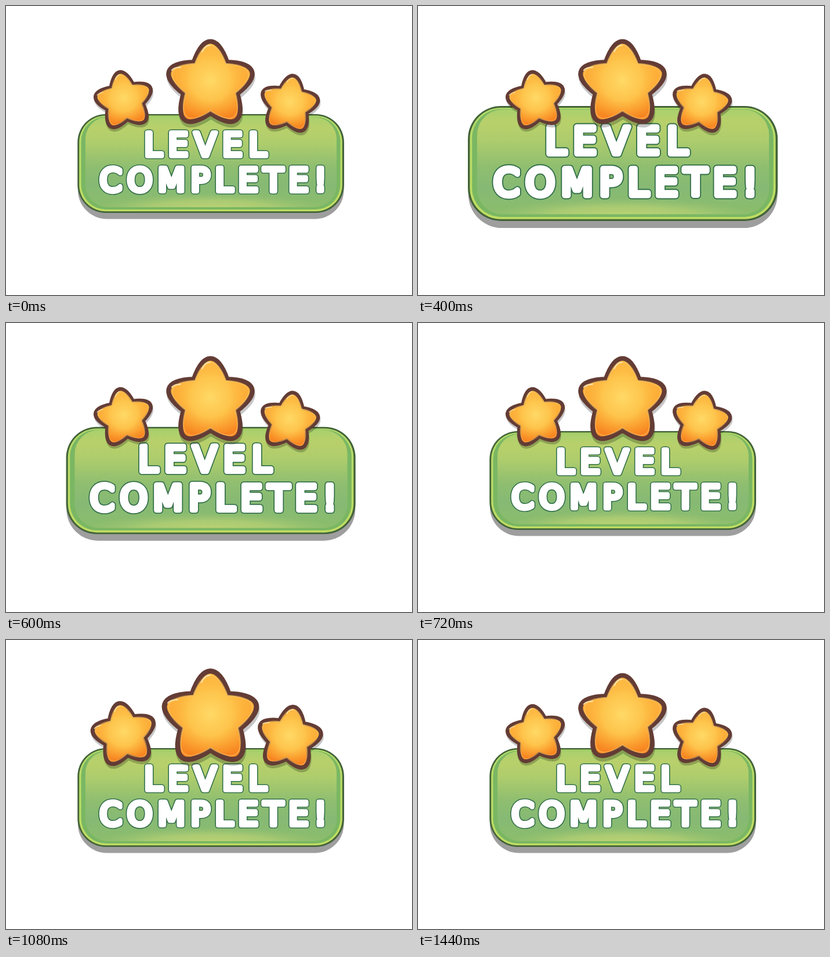
Write an HTML page that moves like this. It is 700 by 500 pixels and loops after 2 s.

```html
<!DOCTYPE html>
<html lang="en">
<head>
<meta charset="utf-8">
<title>Level complete</title>
<style>
  html, body { margin: 0; width: 100%; height: 100%; overflow: hidden; background: #fff; }
  svg { display: block; width: 700px; height: 500px; }
  text {
    font: 400 55px "DejaVu Sans", sans-serif;
    stroke-linejoin: round;
    stroke-linecap: round;
  }
  .edge { fill: #34704a; stroke: #34704a; stroke-width: 11px; }
  .face { fill: #fff; stroke: #fff; stroke-width: 7.8px; }
  .level { letter-spacing: 10.6px; }
  .complete { letter-spacing: 9.2px; }
</style>
</head>
<body>
<svg viewBox="0 0 700 500">
  <defs>
    <linearGradient id="panelFill" x2="0" y2="1">
      <stop offset="0" stop-color="#a9d06d"/>
      <stop offset=".12" stop-color="#b8d06b"/>
      <stop offset=".28" stop-color="#afcd6c"/>
      <stop offset=".55" stop-color="#8fbe70"/>
      <stop offset=".75" stop-color="#86b974"/>
      <stop offset="1" stop-color="#8cbd6c"/>
    </linearGradient>
    <linearGradient id="ringFill" x2="0" y2="1">
      <stop offset="0" stop-color="#b4da68"/>
      <stop offset="1" stop-color="#c0dd62"/>
    </linearGradient>
    <radialGradient id="panelGlow">
      <stop offset="0" stop-color="#bfd474"/>
      <stop offset=".55" stop-color="#b4cf74" stop-opacity=".75"/>
      <stop offset="1" stop-color="#9fc673" stop-opacity="0"/>
    </radialGradient>
    <linearGradient id="starFill" x2="0" y2="1">
      <stop offset="0" stop-color="#fdbb45"/>
      <stop offset=".55" stop-color="#fda833"/>
      <stop offset="1" stop-color="#f67f1e"/>
    </linearGradient>
    <radialGradient id="starGlow" gradientUnits="userSpaceOnUse" cx="0" cy="-8" r="72">
      <stop offset="0" stop-color="#ffd966"/>
      <stop offset=".5" stop-color="#fec84f" stop-opacity=".9"/>
      <stop offset="1" stop-color="#fdb23a" stop-opacity="0"/>
    </radialGradient>
    <clipPath id="panelClip"><rect x="137" y="192" width="433" height="156" rx="38"/></clipPath>
    <path id="starShape"/>
  </defs>

  <g id="banner">
    <rect x="124" y="198.5" width="458.5" height="170" rx="50" opacity=".38"/>
    <rect x="123.3" y="187" width="459.6" height="171" rx="49" fill="#426339"/>
    <rect x="126.2" y="189.5" width="453.6" height="165.8" rx="46" fill="url(#ringFill)"/>
    <rect x="129.5" y="191.5" width="447" height="160.5" rx="43" fill="#7ab763"/>
    <rect x="137" y="192" width="433" height="156" rx="38" fill="url(#panelFill)"/>
    <ellipse cx="353" cy="352" rx="200" ry="28" fill="url(#panelGlow)" clip-path="url(#panelClip)"/>
    <g id="words"></g>
  </g>
  <g id="stars"></g>
</svg>
<script>
const NS = "http://www.w3.org/2000/svg";
const $ = id => document.getElementById(id);

function add(parent, tag, attrs, content) {
  const node = document.createElementNS(NS, tag);
  for (const key in attrs) node.setAttribute(key, attrs[key]);
  if (content) node.textContent = content;
  parent.append(node);
  return node;
}

for (const layer of ["edge", "face"]) {
  add($("words"), "text", { class: layer + " level", x: 238.2, y: 258.6 }, "LEVEL");
  add($("words"), "text", { class: layer + " complete", x: 161.4, y: 320 }, "COMPLETE!");
}

// One puffy arm, repeated every 72 degrees
function starPath() {
  const arm = [[-24, -52], [-14, -74.5], [0, -74.5], [14, -74.5], [24, -52], [28.5, -39.2]];
  let d = "M-28.5-39.2";
  for (let i = 0; i < 5; i++) {
    const a = i * Math.PI * 0.4, c = Math.cos(a), s = Math.sin(a);
    const pts = arm.map(([x, y]) => (x * c - y * s).toFixed(2) + "," + (x * s + y * c).toFixed(2));
    d += "C" + pts.slice(0, 3).join(" ") + "C" + pts.slice(3).join(" ");
  }
  return d + "Z";
}
$("starShape").setAttribute("d", starPath());

function makeStar(x, y, size, turn, line) {
  const star = add($("stars"), "g", {});
  const pose = `rotate(${turn}) scale(${size})`;
  const width = line / size;
  const use = (parent, attrs) => add(parent, "use", { href: "#starShape", "stroke-linejoin": "round", ...attrs });
  use(star, { transform: `translate(1 ${5 * size + 1}) ${pose}`, stroke: "#000", "stroke-width": width, opacity: 0.22 });
  const body = add(star, "g", { transform: pose });
  use(body, { fill: "url(#starFill)", stroke: "#633c35", "stroke-width": width });
  use(body, { fill: "url(#starGlow)", transform: "scale(.95)" });
  use(body, { fill: "none", stroke: "#ffcc70", "stroke-width": 1.5, opacity: 0.6, transform: "scale(.91)" });
  add(body, "path", {
    d: "M-14-57Q-9-68-1-68M-66-25Q-62-30-51-30",
    fill: "none", stroke: "#ffe9b5", "stroke-width": 2.2, "stroke-linecap": "round", opacity: 0.85
  });
  return { node: star, x, y };
}

const stars = [
  makeStar(204, 164, 0.675, -9, 6.5),
  makeStar(488.5, 170.5, 0.675, 8, 6.5),
  makeStar(352.5, 136.5, 1.01, 0, 8)
];

const LOOP = 2000, STEP = 40, RISE = 280, FALL = 220;

// Swell to 1.2 and back, eased both ways
function pulse(t, start) {
  const dt = t - start;
  if (dt <= 0 || dt >= RISE + FALL) return 1;
  const p = dt < RISE ? dt / RISE : (RISE + FALL - dt) / FALL;
  return 1 + 0.1 * (1 - Math.cos(Math.PI * p));
}

function draw(now) {
  const t = Math.floor((now % LOOP) / STEP) * STEP;
  const b = pulse(t, 200), s = pulse(t, 940);
  $("banner").setAttribute("transform", `translate(353 272.5) scale(${b}) translate(-353 -272.5)`);
  for (const { node, x, y } of stars) {
    node.setAttribute("transform", `translate(${x} ${y}) scale(${s})`);
  }
}

let begin;
function tick(now) {
  begin ??= now;
  draw(now - begin);
  requestAnimationFrame(tick);
}
draw(0);
requestAnimationFrame(tick);
</script>
</body>
</html>
```
